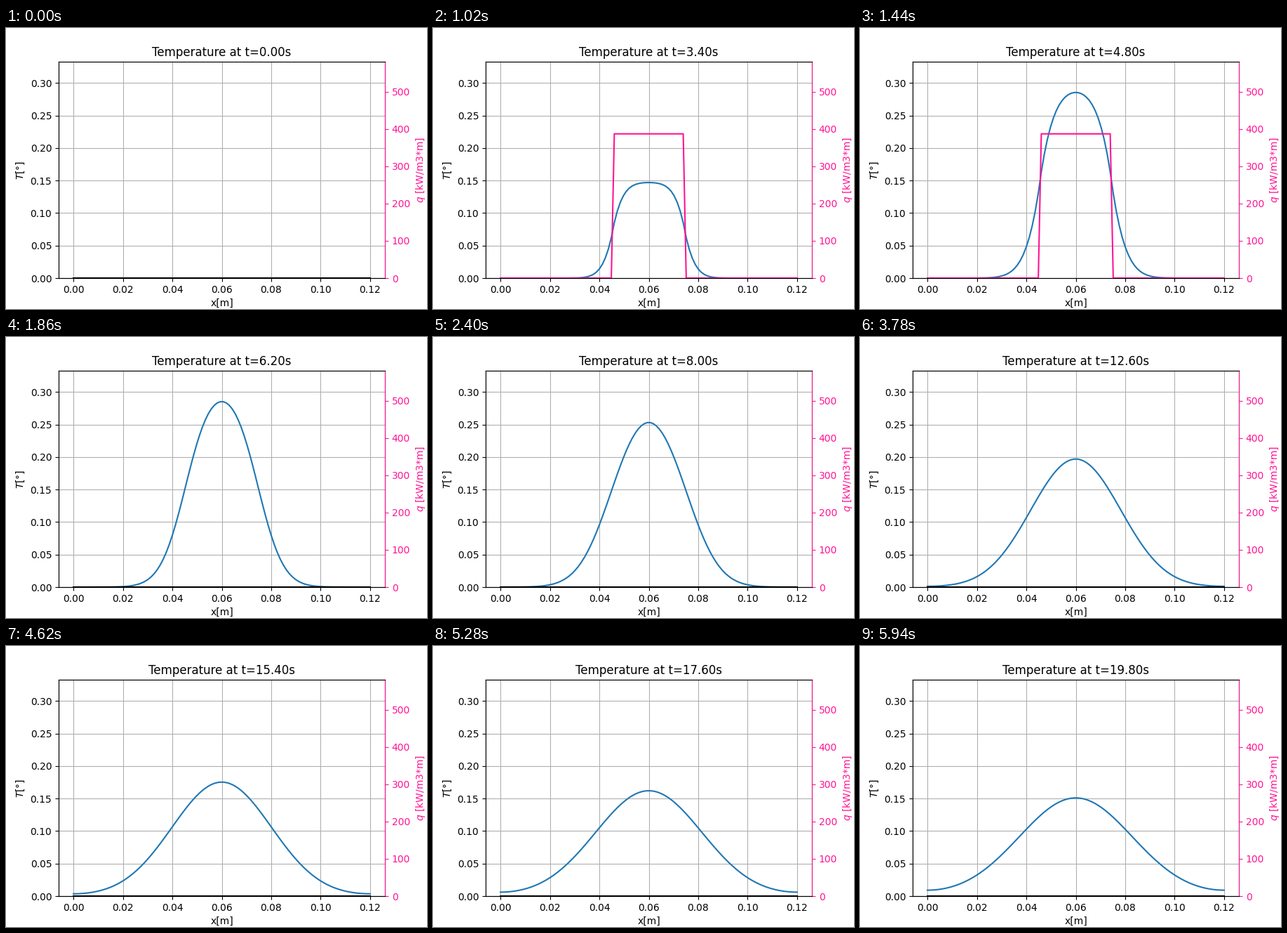
Write a matplotlib script that moves like this. It is 600x400 px and loops after 6000 ms.

```python
import numpy as np
import matplotlib.pyplot as plt
from matplotlib.animation import FuncAnimation

FRAMES, INTERVAL = 100, 60
DT, SUBSTEPS = 0.2, 10          # seconds per frame, solver steps per frame
LENGTH, NODES = 0.12, 100
DIFFUSIVITY = 1.364e-5          # m2/s
LOSS = 0.0042                   # 1/s, heat lost to the surroundings
POWER = 387.2                   # kW/m3
HEAT_RATE = 0.1056              # degrees per second at full power
ON, OFF = 2, 5                  # heating period in seconds
PINK = "deeppink"

x = np.linspace(0, LENGTH, NODES)
heated = ((x >= 0.045) & (x <= 0.075)).astype(float)


def is_on(frame):
    return ON / DT < frame <= OFF / DT


def solve():
    """Explicit heat equation with insulated ends."""
    step = DT / SUBSTEPS
    spread = DIFFUSIVITY * step / (x[1] - x[0]) ** 2
    temp = np.zeros(NODES)
    history = [temp]
    for frame in range(1, FRAMES):
        source = heated * HEAT_RATE * is_on(frame)
        for _ in range(SUBSTEPS):
            wide = np.pad(temp, 1, mode="reflect")
            curve = wide[2:] - 2 * temp + wide[:-2]
            temp = temp + spread * curve + step * (source - LOSS * temp)
        history.append(temp)
    return history


temps = solve()

fig, ax = plt.subplots(figsize=(6, 4), dpi=100)
temp_line, = ax.plot(x, temps[0])
ax.set_ylim(0, 1.05 * HEAT_RATE * (OFF - ON))
ax.set_xlabel("x[m]")
ax.set_ylabel("$T$[°]")
ax.grid()
title = ax.set_title("")

ax_q = ax.twinx()
q_line, = ax_q.plot(x, 0 * x, color="black")
ax_q.set_ylim(0, 1.5 * POWER)
ax_q.set_ylabel("$q$ [kW/m3*m]", color=PINK)
ax_q.tick_params(axis="y", colors=PINK)
ax_q.spines["right"].set_color(PINK)


def draw(frame):
    on = is_on(frame)
    temp_line.set_ydata(temps[frame])
    q_line.set_ydata(heated * POWER * on)
    q_line.set_color(PINK if on else "black")
    title.set_text(f"Temperature at t={frame * DT:.2f}s")
    return temp_line, q_line, title


anim = FuncAnimation(fig, draw, frames=FRAMES, interval=INTERVAL,
                     repeat=True, repeat_delay=0, blit=False)
plt.show()
```
